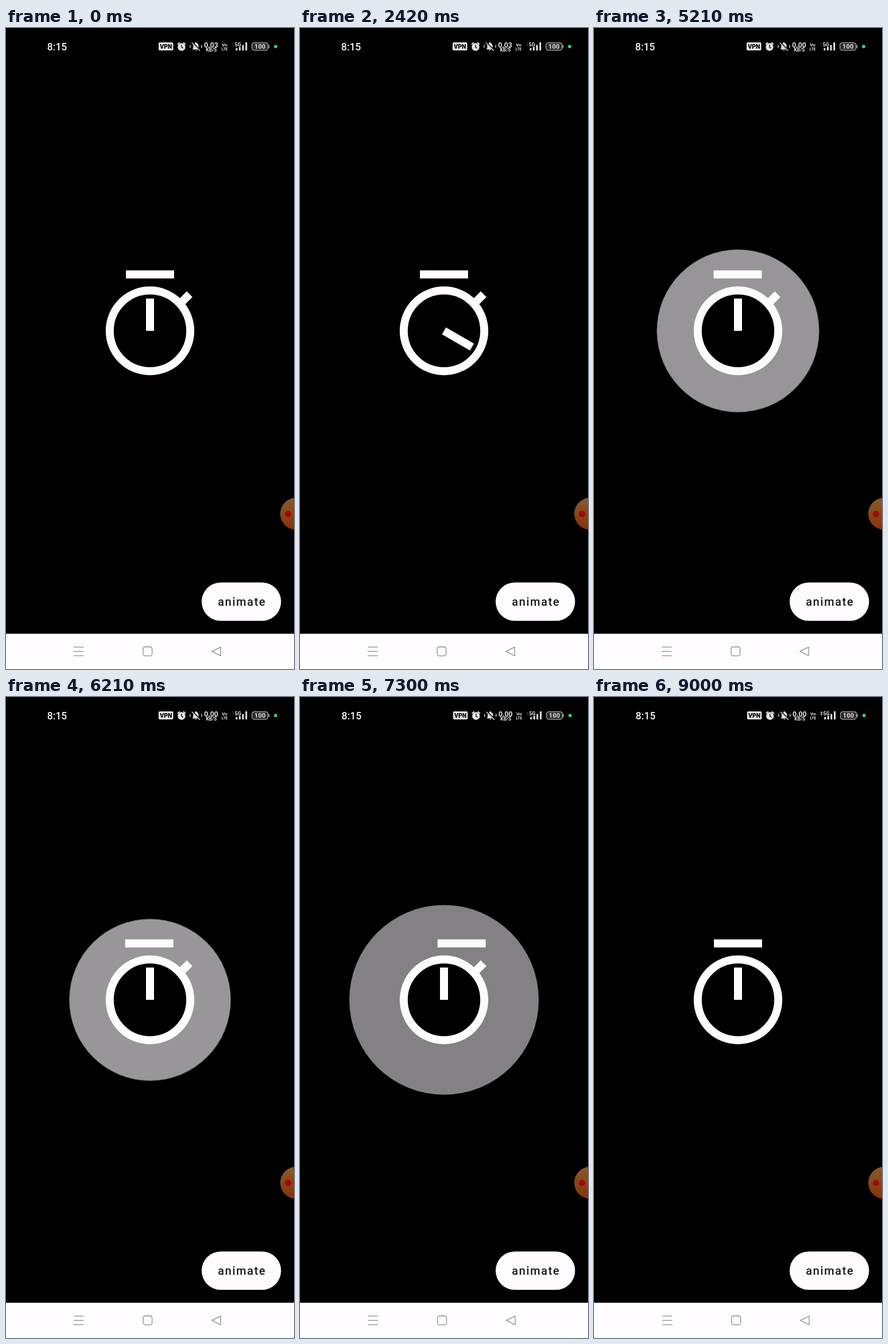
These frames come from a looping animation (502x1115 px, 9060 ms). An HTML page without scripts:

```html
<!DOCTYPE html>
<html lang="en">
<head>
<meta charset="utf-8">
<title>Stopwatch</title>
<style>
  :root { --loop: 9060ms; --paper: #fffbff; --out: cubic-bezier(.4, 0, .2, 1); }
  html, body { margin: 0; width: 100%; height: 100%; overflow: hidden; background: #000; }
  svg { display: block; width: 502px; height: 1115px; font-family: Roboto, sans-serif; }
  .paper { fill: var(--paper); }

  .wave, .hand { transform-origin: 251px 526.8px; }
  .wave {
    fill: var(--paper); opacity: 0;
    animation: grow var(--loop) var(--out) infinite, fade var(--loop) linear infinite;
  }
  .w1 { animation-delay: 4806ms; }
  .w2 { animation-delay: 5808ms; }
  .w3 { animation-delay: 6818ms; }
  @keyframes grow {
    0% { transform: scale(.1333); }
    11.04%, 100% { transform: scale(1); }
  }
  @keyframes fade {
    0% { opacity: 1; }
    11.04%, 100% { opacity: 0; }
  }

  .hand { animation: tick var(--loop) step-end infinite; }
  @keyframes tick {
    0% { transform: rotate(0deg); }
    17.1% { transform: rotate(30deg); }
    20.08% { transform: rotate(60deg); }
    23.06% { transform: rotate(90deg); }
    26.7% { transform: rotate(120deg); }
    30.12% { transform: rotate(150deg); }
    33.1% { transform: rotate(180deg); }
    36.74% { transform: rotate(210deg); }
    40.17% { transform: rotate(240deg); }
    43.15% { transform: rotate(270deg); }
    46.46% { transform: rotate(300deg); }
    50.21% { transform: rotate(330deg); }
    53.19%, 100% { transform: rotate(360deg); }
  }

  .knob { animation: press var(--loop) var(--out) infinite; }
  @keyframes press {
    0%, 6.73%, 13.36%, 95.92% { transform: translate(0, 0); }
    10.04%, 99.2%, 100% { transform: translate(-15px, 15px); }
  }

  /* the shake runs 36 whole cycles per loop and is shown only while ringing */
  .still { animation: still var(--loop) step-end infinite; }
  .ring { animation: ring var(--loop) step-end infinite; }
  .shake { animation: shake calc(var(--loop) / 36) infinite; }
  @keyframes still {
    0%, 85.42%, 100% { visibility: visible; }
    53.47% { visibility: hidden; }
  }
  @keyframes ring {
    0%, 85.42%, 100% { visibility: hidden; }
    53.47% { visibility: visible; }
  }
  @keyframes shake {
    0%, 100% { transform: translateX(31.5px); }
    0%, 50% { animation-timing-function: cubic-bezier(.36, 0, .67, .64); }
    25%, 75% { transform: translateX(0); animation-timing-function: cubic-bezier(.33, .36, .64, 1); }
    50% { transform: translateX(-26px); }
  }

  .before { animation: before var(--loop) step-end infinite; }
  .after { animation: after var(--loop) step-end infinite; }
  @keyframes before {
    0% { visibility: visible; }
    35.75%, 100% { visibility: hidden; }
  }
  @keyframes after {
    0% { visibility: hidden; }
    35.75%, 100% { visibility: visible; }
  }

  .nudge { animation: nudge var(--loop) step-end infinite; }
  @keyframes nudge {
    0% { transform: translateX(0); }
    71.7%, 100% { transform: translateX(.8px); }
  }
  .data { animation: data var(--loop) step-end infinite; }
  @keyframes data {
    0% { fill: #2c2c2c; }
    92%, 100% { fill: #d8d8d8; }
  }
</style>
</head>
<body>
<svg viewBox="0 0 502 1115">
  <defs>
    <linearGradient id="amber" x1="0" y1="0" x2="0" y2="1">
      <stop offset="0" stop-color="#8c5a2b"/>
      <stop offset=".5" stop-color="#874619"/>
      <stop offset="1" stop-color="#84340a"/>
    </linearGradient>
    <rect id="bar" x="209" y="421.6" width="84" height="14"/>
  </defs>
  <rect width="502" height="1115"/>

  <!-- status bar -->
  <g class="nudge" fill="#e4e4e4">
    <text x="71.8" y="38.5" font-size="17.5" font-weight="500" fill="#f2f2f2">8:15</text>

    <rect x="266" y="25" width="25.5" height="14" rx="2"/>
    <text x="278.8" y="36" font-size="10.5" font-weight="800" fill="#000" text-anchor="middle">VPN</text>

    <circle cx="306" cy="33" r="6.7"/>
    <path d="M299 28.5l4-3.2M313 28.5l-4-3.2" stroke="#e4e4e4" stroke-width="1.8"/>
    <path d="M306 29v4.3l3 2" fill="none" stroke="#000" stroke-width="1.3"/>

    <path d="M324.5 37.2l1.8-2v-4.2q.4-4 3.5-4.6v-1.4h2.4v1.4q3.3.6 3.5 4.6v4.2l1.8 2zM329.3 38.3h3.4q-1.7 2.6-3.4 0z"/>
    <path d="M324.5 25.2l14 14" stroke="#000" stroke-width="2.8"/>
    <path d="M324 25.8l14 14M321 29.5v5M341 29.5v5" stroke="#e4e4e4" stroke-width="1.3"/>

    <g font-weight="700" text-anchor="middle">
      <g font-size="12.3">
        <text class="before" x="357.5" y="33.5">0.03</text>
        <text class="after" x="357.5" y="33.5">0.00</text>
      </g>
      <text x="358" y="41" font-size="8.4">KB/S</text>
      <text x="381" y="31.8" font-size="8">Vo</text>
      <text x="381" y="39.3" font-size="6.4">LTE</text>
      <text x="404.3" y="31.8" font-size="8.8">5G</text>
    </g>
    <path class="data" d="M393.5 27.8l2.3-2.8 2.3 2.8zM393.5 29.2l2.3 2.8 2.3-2.8z"/>
    <path d="M400.5 35h3v4h-3zM406 33h3v6h-3zM411.5 29.5h3v9.5h-3zM417.3 25h3v14h-3z"/>

    <rect x="428.7" y="25.6" width="28" height="13.2" rx="4.2" fill="#2b2b2b" stroke="#a9a9a9" stroke-width="1.3"/>
    <rect x="457.6" y="29.5" width="1.6" height="5.5" rx=".8" fill="#a9a9a9"/>
    <text x="442.7" y="36.3" font-size="11.2" font-weight="600" text-anchor="middle">100</text>
    <circle cx="470" cy="32.2" r="2.9" fill="#35d07f"/>
  </g>

  <!-- stopwatch -->
  <circle class="wave w1" cx="251" cy="526.8" r="210"/>
  <circle class="wave w2" cx="251" cy="526.8" r="210"/>
  <circle class="wave w3" cx="251" cy="526.8" r="210"/>
  <path class="knob" d="M303 480L320 463" stroke="#fffbff" stroke-width="14"/>
  <circle cx="251" cy="526.8" r="70.2" stroke="#fffbff" stroke-width="14"/>
  <rect class="hand paper" x="244" y="470.6" width="14" height="56.2"/>
  <g class="still paper"><use href="#bar"/></g>
  <g class="ring paper"><g class="shake"><use href="#bar"/></g></g>

  <!-- floating bubble -->
  <circle cx="506" cy="845" r="28" fill="url(#amber)"/>
  <circle cx="491.5" cy="845.3" r="5.5" fill="#a00a06"/>

  <!-- button -->
  <rect class="paper" x="341" y="964.5" width="138.5" height="66.7" rx="33.3"/>
  <text x="369.2" y="1004.8" font-size="20" font-weight="500" letter-spacing="1.65" fill="#1a181b">animate</text>

  <!-- navigation bar -->
  <rect y="1053.7" width="502" height="62" fill="#fffdff"/>
  <g class="nudge" fill="none" stroke="#8b898c" stroke-width="1.3" stroke-linejoin="round">
    <path d="M118 1076.8h17.5M118 1084.3h17.5M118 1091.8h17.5"/>
    <rect x="239" y="1076.5" width="15.6" height="15.6" rx="3.5"/>
    <path d="M358.8 1084.3l15.4-7.5v15z"/>
  </g>
</svg>
</body>
</html>
```
